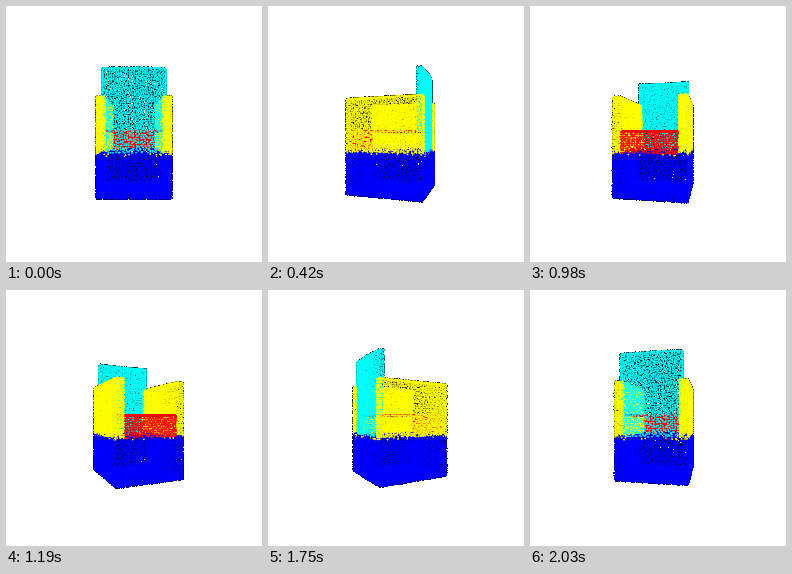
Write a matplotlib script that moves like this. It is 256 px wide and 256 px high and loops after 2.1 s.

```python
import numpy as np
import matplotlib.pyplot as plt
from matplotlib.animation import FuncAnimation

SIZE, FRAMES, INTERVAL = 256, 30, 70
FOCAL = SIZE / 2 / np.tan(np.radians(30))
DIST = 3.0
RADIUS = 0.01 * SIZE / 2
LAYERS = 8
STEP = 0.0262

BACK, ARM, BASE, SEAT = range(4)
COLORS = np.array([[0, 1, 1], [1, 1, 0], [0, 0, 1], [1, 0, 0]], float)

W, INNER, BACK_W, BACK_LOW_W = 0.436, 0.34, 0.375, 0.355
FLOOR, SPLIT, SEAT_TOP, ARM_TOP, BACK_TOP = -0.75, -0.226, 0.035, 0.437, 0.77
REAR, FRONT = -0.45, 0.507
BACK_Z, BULGE = (-0.42, -0.37), 0.03

rng = np.random.default_rng(7)


def patch(corner, u, v):
    """Evenly spread, jittered points over a parallelogram."""
    u, v = np.array(u), np.array(v)
    nu, nv = (max(1, round(np.linalg.norm(e) / STEP)) for e in (u, v))
    a, b = np.meshgrid(np.arange(nu), np.arange(nv))
    jitter = rng.uniform(-0.36, 0.36, (2, a.size))
    s = (a.ravel() + 0.5 + jitter[0]) / nu
    t = (b.ravel() + 0.5 + jitter[1]) / nv
    return np.array(corner) + s[:, None] * u + t[:, None] * v


def box(xs, ys, zs, faces):
    """Points on the chosen faces: l r (x), d u (y), b f (z)."""
    lo = np.array([xs[0], ys[0], zs[0]])
    span = np.diag([xs[1] - xs[0], ys[1] - ys[0], zs[1] - zs[0]])
    parts = []
    for face in faces:
        axis, side = divmod("lrdubf".index(face), 2)
        u, v = (span[k] for k in range(3) if k != axis)
        parts.append(patch(lo + side * span[axis], u, v))
    return np.concatenate(parts)


def build_chair():
    low_x = (-BACK_LOW_W, BACK_LOW_W)
    back = np.concatenate([
        box((-BACK_W, BACK_W), (ARM_TOP, BACK_TOP), BACK_Z, "lrubf"),
        box(low_x, (SPLIT, ARM_TOP), BACK_Z, "b"),
        box(low_x, (SEAT_TOP, ARM_TOP), BACK_Z, "f")])
    back[:, 2] -= BULGE * (1 - (back[:, 0] / BACK_W) ** 2)
    arms = np.concatenate([
        box(xs, (SPLIT, ARM_TOP), (REAR, FRONT), "lrubf")
        for xs in ((-W, -INNER), (INNER, W))])
    base = box((-W, W), (FLOOR, SPLIT), (REAR, FRONT), "lrdbf")
    # The seat front is a double layer
    seat = box((-INNER, INNER), (SPLIT, SEAT_TOP), (BACK_Z[1], FRONT), "uff")

    groups = [back, arms, base, seat]
    pts = np.concatenate(groups)
    tags = np.repeat(np.arange(4), [len(g) for g in groups])
    # Ragged border between the arms and the base
    edge = SPLIT + rng.normal(0, 0.012, len(pts))
    low = pts[:, 1] < edge
    tags[low] = BASE
    tags[~low & (tags == BASE)] = ARM
    return pts, COLORS[tags]


POINTS, RGB = build_chair()
DX, DY = (g.ravel() for g in np.meshgrid([-1, 0, 1], [-1, 0, 1]))


def render(i):
    """Splat the cloud as soft discs, blended front to back."""
    az = np.radians(180 - 360 * i / FRAMES)
    x, y, z = POINTS.T
    depth = DIST - (x * np.sin(az) + z * np.cos(az))
    side = -x * np.cos(az) + z * np.sin(az)
    px = SIZE / 2 - 0.5 - FOCAL * side / depth
    py = SIZE / 2 - 0.5 - FOCAL * y / depth

    cx = np.rint(px).astype(int)[:, None] + DX
    cy = np.rint(py).astype(int)[:, None] + DY
    alpha = 1 - ((cx - px[:, None]) ** 2 + (cy - py[:, None]) ** 2) / RADIUS ** 2
    who, nb = np.nonzero(alpha > 0)
    alpha = alpha[who, nb]
    pix = cy[who, nb] * SIZE + cx[who, nb]

    order = np.lexsort((depth[who], pix))
    who, alpha, pix = who[order], alpha[order], pix[order]
    rank = np.arange(len(pix)) - np.searchsorted(pix, pix)

    img = np.zeros((SIZE * SIZE, 3))
    clear = np.ones(SIZE * SIZE)
    for k in range(LAYERS):
        sel = rank == k
        p, a = pix[sel], alpha[sel]
        img[p] += (a * clear[p])[:, None] * RGB[who[sel]]
        clear[p] *= 1 - a
    empty = np.ones(SIZE * SIZE, bool)
    empty[pix] = False
    img[empty] = 1
    return np.clip(img, 0, 1).reshape(SIZE, SIZE, 3)


fig = plt.figure(figsize=(SIZE / 100, SIZE / 100), dpi=100, facecolor="white")
ax = fig.add_axes([0, 0, 1, 1])
ax.axis("off")
view = ax.imshow(render(0), interpolation="nearest", aspect="auto")


def update(i):
    view.set_data(render(i))
    return (view,)


anim = FuncAnimation(fig, update, frames=FRAMES, interval=INTERVAL,
                     repeat=True, repeat_delay=0, blit=False)
plt.show()
```
